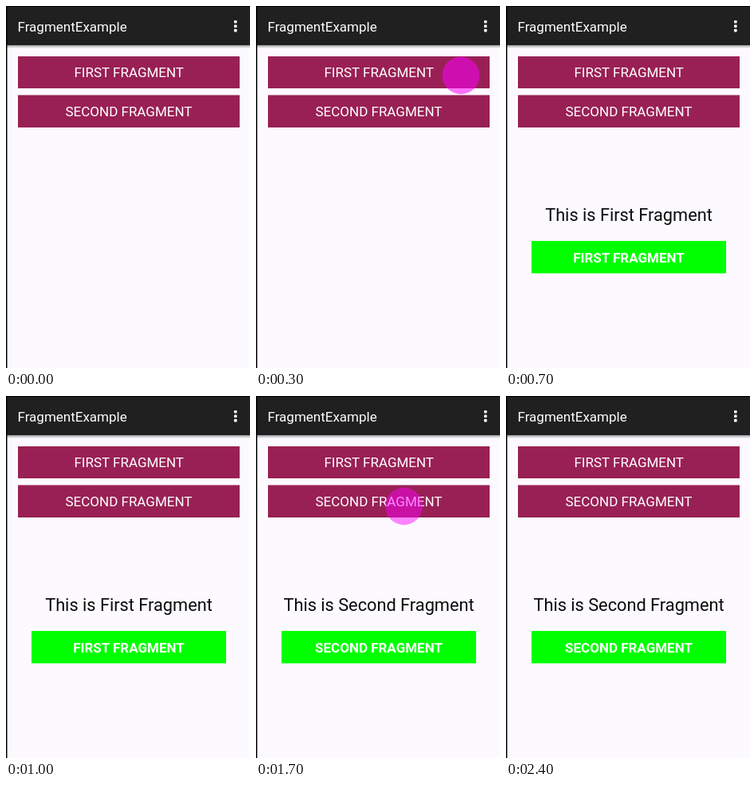
An HTML page for the animation above (3 s loop, 306 by 453 pixels).

```html
<!DOCTYPE html>
<html lang="en">
<head>
<meta charset="utf-8">
<title>Fragment example</title>
<style>
  html, body { margin: 0; width: 100%; height: 100%; overflow: hidden; background: #fcfaff; }
  svg { display: block; width: 306px; height: 453px; }
  text { font-family: Roboto, "Open Sans", sans-serif; font-size: 17px; fill: #fff; }
  .mid { text-anchor: middle; }
  .bar { fill: #992054; }
  .go { fill: #00ff00; }
  .bold { font-weight: 700; }
  .line { font-size: 21.75px; fill: #0a0a0a; }
  .note { font-size: 11.5px; fill: #808080; }
  .touch { fill: #ff00ff; }
  #first, #second, #note, .touch { opacity: 0; }
</style>
</head>
<body>
<svg viewBox="0 0 306 453">
  <defs>
    <linearGradient id="shade" x1="0" y1="0" x2="0" y2="1">
      <stop offset="0" stop-color="#000" stop-opacity=".38"/>
      <stop offset="1" stop-color="#000" stop-opacity="0"/>
    </linearGradient>
  </defs>
  <rect width="306" height="453" fill="#fcfaff"/>
  <rect y="49" width="306" height="4" fill="url(#shade)"/>
  <rect width="306" height="49" fill="#212021"/>
  <rect width="306" height="1" fill="#000"/>
  <rect width="1.5" height="453" fill="#000"/>
  <g id="note">
    <text class="note" x="17" y="2">I.</text>
    <text class="note" x="30" y="2">started recording</text>
  </g>
  <text x="14.5" y="32">FragmentExample</text>
  <g fill="#fff">
    <rect x="286" y="18" width="3.6" height="3.6" rx="1"/>
    <rect x="286" y="23.4" width="3.6" height="3.6" rx="1"/>
    <rect x="286" y="28.8" width="3.6" height="3.6" rx="1"/>
  </g>

  <rect class="bar" x="15" y="63" width="278" height="40"/>
  <text class="mid" x="154.2" y="89">FIRST FRAGMENT</text>
  <rect class="bar" x="15" y="111.5" width="278" height="40.5"/>
  <text class="mid" x="154" y="138">SECOND FRAGMENT</text>

  <g id="first">
    <text class="mid line" x="154" y="269">This is First Fragment</text>
    <rect class="go" x="32" y="294" width="244" height="40.5"/>
    <text class="mid bold" x="154" y="320.5">FIRST FRAGMENT</text>
  </g>
  <g id="second">
    <text class="mid line" x="154" y="269">This is Second Fragment</text>
    <rect class="go" x="32" y="294" width="244" height="40.5"/>
    <text class="mid bold" x="154" y="320.5">SECOND FRAGMENT</text>
  </g>

  <circle id="tapA" class="touch" cx="257" cy="87" r="23.4"/>
  <circle id="tapB" class="touch" cx="185.5" cy="138" r="23.4"/>
</svg>
<script>
  const LOOP = 3000;
  const touch = [0.5, 0.54, 0.47, 0.32, 0.16, 0];
  const tap = start => touch.map((alpha, i) => [start + i * 100, alpha]);

  // Each step is [time in ms, opacity held from then on].
  const tracks = {
    first: [[400, 1], [1700, 0]],
    second: [[1700, 1]],
    note: [[400, 1], [500, 0]],
    tapA: tap(200),
    tapB: tap(1500)
  };

  for (const [id, steps] of Object.entries(tracks)) {
    const last = steps[steps.length - 1][1];
    const frames = [[0, 0], ...steps, [LOOP, last]].map(([time, opacity]) => (
      { offset: time / LOOP, opacity, easing: "step-end" }
    ));
    const anim = document.getElementById(id).animate(frames, { duration: LOOP, iterations: Infinity });
    anim.startTime = 0;
  }
</script>
</body>
</html>
```
